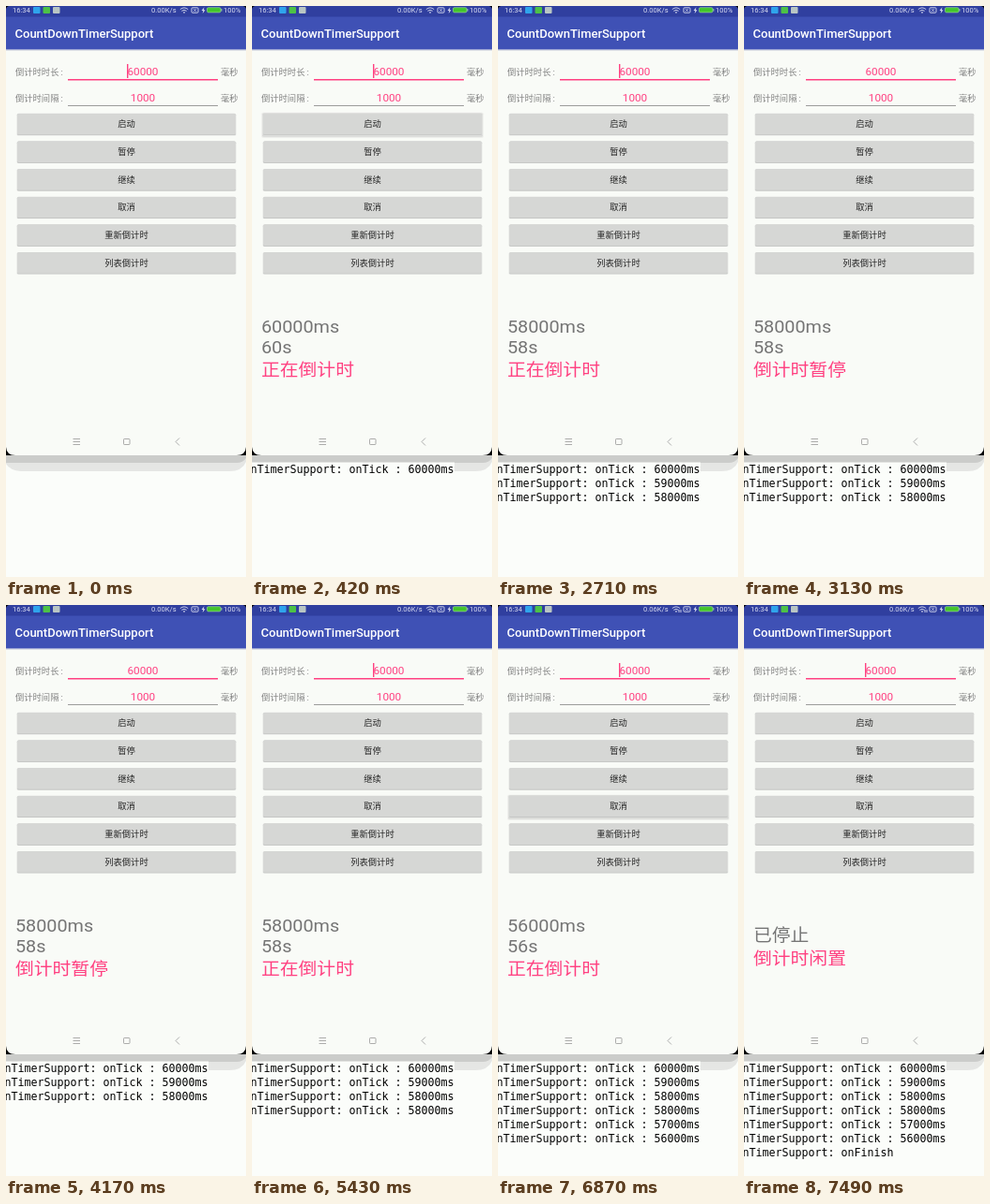
An HTML page for the animation above (8 s loop, 256 by 610 pixels).

```html
<!DOCTYPE html>
<html lang="zh-CN">
<head>
<meta charset="utf-8">
<title>CountDownTimerSupport</title>
<style>
  html, body { margin: 0; width: 100%; height: 100%; overflow: hidden; background: #fbfdfa; }
  svg { display: block; width: 256px; height: 610px; }
  text { font-family: Roboto, "Noto Sans CJK SC", "Noto Sans CJK", sans-serif; white-space: pre; }
  /* the phone screen is shown slightly flattened */
  .phone text { transform: scaleY(.93); }
  .status { font-size: 7.6px; fill: #d9dcf0; }
  .title { font-size: 13px; font-weight: 500; fill: #fff; }
  .label { font-size: 9.3px; fill: #808080; }
  .field { font-size: 11.75px; fill: #ff4081; text-anchor: middle; }
  .btn text { font-size: 9.3px; font-weight: 500; fill: #222; text-anchor: middle; }
  .big { font-size: 19.8px; fill: #757575; }
  .pink { fill: #ff4081; }
  .log text { font: 11.63px "DejaVu Sans Mono", monospace; fill: #000; }
  .nav { fill: none; stroke: #999; stroke-width: .8; }
  .lift { opacity: 0; }
  .pressed .lift { opacity: 1; }
</style>
</head>
<body>
<svg viewBox="0 0 256 610">
  <rect width="256" height="610" fill="#fbfdfa"/>

  <!-- shadow below the phone -->
  <path d="M0 478H256V487Q252 497 238 497H16Q4 496 0 489Z" fill="#e5e6e4"/>
  <path d="M0 478H256V483Q253 488 246 488H0Z" fill="#cbccca"/>
  <rect id="cover" y="487.5" width="216" height="12" fill="#fbfdfa"/>
  <g class="log" id="log"></g>

  <g class="phone">
    <path d="M0 470H256V480H0Z" fill="#000"/>
    <path d="M0 0H256V471Q255.500 480 246 480H10Q.5 480 0 471Z" fill="#f9fbf7"/>
    <rect y="46" width="256" height="1" fill="#9aa3d4"/>
    <rect y="47" width="256" height="1" fill="#dcdfe6"/>
    <rect width="256" height="46" fill="#3f51b5"/>
    <rect width="256" height="11.500" fill="#303f9f"/>
    <path d="M0 0H3Q.5 .5 0 3ZM256 0V3Q255.500 .5 253 0Z" fill="#000"/>

    <!-- status bar -->
    <text class="status" x="7" y="7.200">16:34</text>
    <rect x="29" y="1" width="7.500" height="7" rx="1" fill="#2fa4ec"/>
    <rect x="39.500" y="1" width="7.500" height="7" rx="1" fill="#4dc247"/>
    <rect x="50" y="1" width="7.500" height="7" rx="1" fill="#b9c6c4"/>
    <text class="status" id="speed" x="155" y="7.200"></text>
    <g fill="none" stroke="#d9dcf0" stroke-width=".9">
      <path d="M185.800 3.600Q190 .2 194.200 3.600M187.400 5.300Q190 3.300 192.600 5.300"/>
      <circle cx="190" cy="6.900" r=".5"/>
      <path id="traffic" d="M193 5V8M195 5V8"/>
      <rect x="198" y="1.800" width="7" height="5.400" rx="1"/>
      <path d="M200.300 3.300L202.700 5.700M202.700 3.300L200.300 5.700"/>
    </g>
    <path d="M211.400 1.300L208.600 5H210.300L209.700 8L212.500 4.200H210.800Z" fill="#d9dcf0"/>
    <rect x="214.500" y="1.700" width="14.500" height="5.200" rx="1.300" fill="#43c52c" stroke="#a6d8a7" stroke-width=".6"/>
    <rect x="229.400" y="3" width="1" height="2.600" fill="#a6d8a7"/>
    <text class="status" x="232" y="7.200">100%</text>
    <text class="title" x="9.500" y="33.800">CountDownTimerSupport</text>

    <!-- inputs -->
    <text class="label" x="10" y="73.800">倒计时时长</text><text class="label" x="58.500" y="73.800">:</text>
    <text class="field" x="146" y="74">60000</text>
    <text class="label" x="229" y="73.800">毫秒</text>
    <rect x="66" y="78" width="160" height="1.500" fill="#ff4081"/>
    <rect id="caret" x="129" y="62" width="1.400" height="15" fill="#ff4081"/>
    <text class="label" x="10" y="101.800">倒计时间隔</text><text class="label" x="58.500" y="101.800">:</text>
    <text class="field" x="146" y="101.600">1000</text>
    <text class="label" x="229" y="101.800">毫秒</text>
    <rect x="66" y="106" width="160" height=".8" fill="#858585"/>

    <g id="buttons"></g>

    <text class="big" id="line1" x="10"></text>
    <text class="big" id="line2" x="10" y="370.800"></text>
    <text class="big pink" id="state" x="10"></text>

    <!-- navigation -->
    <g class="nav">
      <path d="M71.500 462.500H79M71.500 465.500H79M71.500 468.500H79"/>
      <rect x="125.500" y="462.500" width="6.500" height="6" rx=".7"/>
      <path d="M185 461.500L181 465.500L185 469.500"/>
    </g>
  </g>
</svg>
<script>
const LOOP = 8000;
const $ = id => document.getElementById(id);
const NS = 'http://www.w3.org/2000/svg';

function add(parent, tag, attrs, text = '') {
  const el = document.createElementNS(NS, tag);
  for (const key in attrs) el.setAttribute(key, attrs[key]);
  el.textContent = text;
  parent.append(el);
  return el;
}

const buttons = ['启动', '暂停', '继续', '取消', '重新倒计时', '列表倒计时'].map((name, i) => {
  const y = 114.7 + i * 29.65;
  const g = add($('buttons'), 'g', { class: 'btn' });
  const box = (dx, dy, w, h, fill, cls = '') =>
    add(g, 'rect', { x: 12 + dx, y: y + dy, width: w, height: h, rx: 1.5, fill, class: cls });
  box(-1.8, -1, 236.6, 27, '#ebece9', 'lift');
  box(-1, -.3, 235, 25.3, '#d9dad7', 'lift');
  box(-.5, .3, 234, 23.4, '#e2e3e1');
  box(0, .5, 233, 22.9, '#bfc0be');
  box(0, 0, 233, 22.7, '#d6d7d5');
  add(g, 'text', { x: 128.5, y: y + 14.8 }, name);
  return g;
});

// [button, down, up]
const presses = [[0, 210, 840], [1, 2920, 3130], [2, 4380, 5010], [3, 6670, 7280]];

const caretFlips = [210, 420, 1050, 1670, 2080, 2500, 3130, 3540,
  4170, 4590, 5010, 5430, 6050, 6460, 7080, 7490];

// [time, seconds left]
const ticks = [[420, 60], [1460, 59], [2500, 58], [4590, 58], [5630, 57], [6670, 56]];
const pauseAt = 3130, resumeAt = 4590, stopAt = 7080;

const logs = [...ticks.map(([at, s]) => [at, `onTick : ${s}000ms`]), [stopAt, 'onFinish']]
  .map(([at, msg], i) => ({
    at, el: add($('log'), 'text', { x: -1.4, y: 499 + i * 15 }, 'nTimerSupport: ' + msg)
  }));

// Keeps a flattened text standing on its baseline.
function setBase(el, y) {
  el.setAttribute('y', y);
  el.style.transformOrigin = `0 ${y}px`;
}
document.querySelectorAll('.phone text').forEach(el => setBase(el, el.getAttribute('y') || 0));

function show(el, on) {
  el.setAttribute('visibility', on ? 'visible' : 'hidden');
}

function put(id, text, y) {
  const el = $(id);
  if (el.textContent !== text) el.textContent = text;
  if (y) setBase(el, y);
}

function draw(t) {
  const passed = ticks.filter(([at]) => t >= at);
  const started = passed.length > 0;
  const stopped = t >= stopAt;
  const left = started ? passed[passed.length - 1][1] : 0;
  const paused = t >= pauseAt && t < resumeAt;

  show($('caret'), caretFlips.filter(at => t >= at).length % 2 === 0);
  show($('cover'), started);
  show($('traffic'), t >= resumeAt);
  put('speed', t >= resumeAt ? '0.06K/s' : '0.00K/s');
  logs.forEach(({ at, el }) => show(el, t >= at));
  presses.forEach(([i, down, up]) => buttons[i].classList.toggle('pressed', t >= down && t < up));

  if (stopped) {
    put('line1', '已停止', 359.5);
    put('line2', '');
    put('state', '倒计时闲置', 384.5);
  } else {
    put('line1', started ? `${left}000ms` : '', 348.8);
    put('line2', started ? `${left}s` : '');
    put('state', !started ? '' : paused ? '倒计时暂停' : '正在倒计时', 395.3);
  }
}

const start = performance.now();
function frame() {
  draw((performance.now() - start) % LOOP);
  requestAnimationFrame(frame);
}
frame();
</script>
</body>
</html>
```
